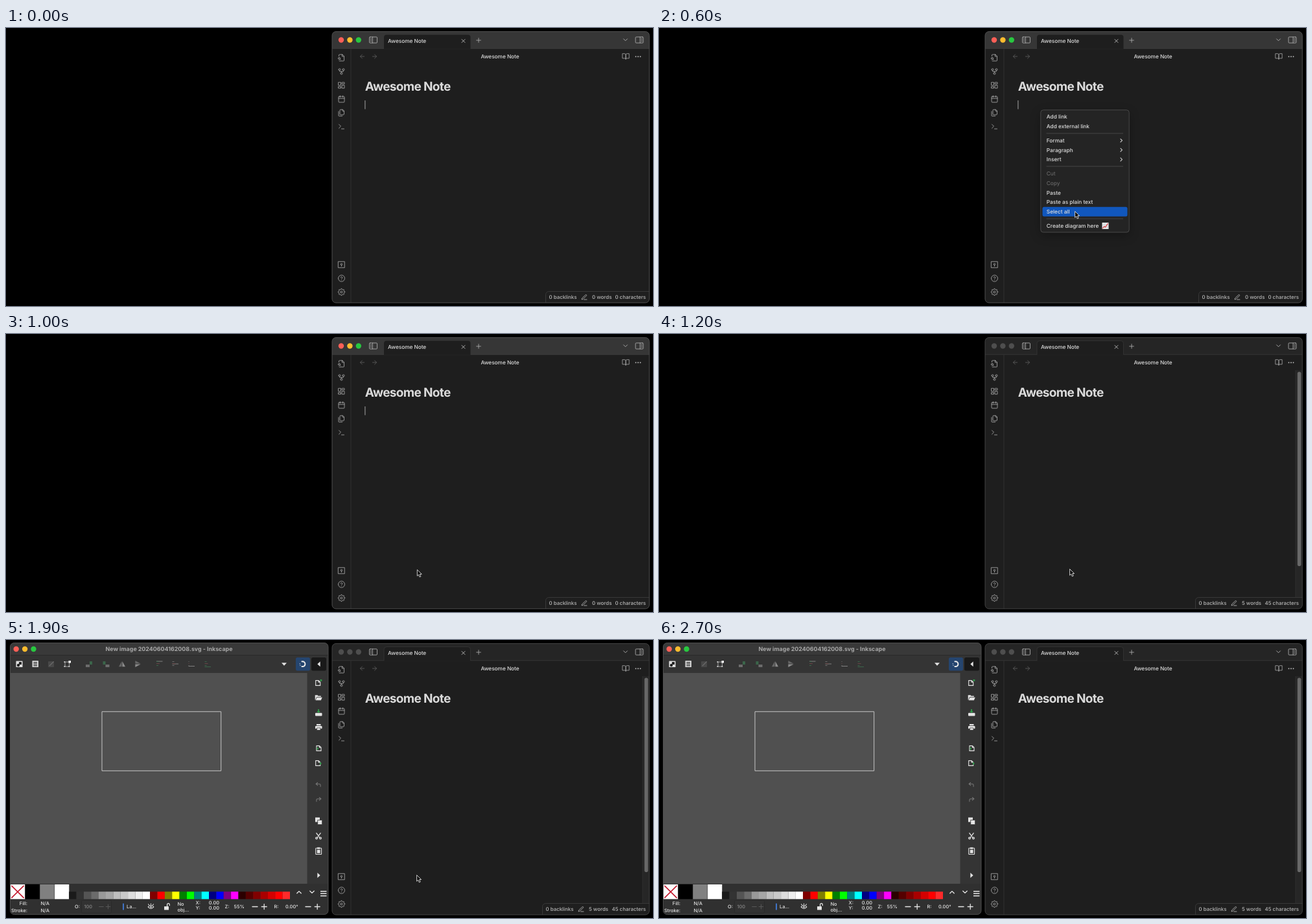
Recreate the animation shown at these times as an HTML page with a canvas. Size 998 px wide and 430 px high, loop 2800 ms.

```html
<!DOCTYPE html>
<html lang="en">
<head>
<meta charset="utf-8">
<title>Create a diagram from a note</title>
<style>
html, body { margin: 0; width: 100%; height: 100%; overflow: hidden; background: #000; }
canvas { display: block; width: 998px; height: 430px; }
</style>
</head>
<body>
<canvas id="stage" width="998" height="430"></canvas>
<script>
const c = document.getElementById('stage').getContext('2d');
const LOOP = 2800, STEP = 100;
const FONT = 'Inter, "Liberation Sans", sans-serif';

// ---------- helpers ----------
function box(x, y, w, h, fill, r = 0, stroke, lw = 1) {
  c.beginPath();
  c.roundRect(x, y, w, h, r);
  if (fill) { c.fillStyle = fill; c.fill(); }
  if (stroke) { c.strokeStyle = stroke; c.lineWidth = lw; c.stroke(); }
}
function dot(x, y, r, fill) {
  c.beginPath();
  c.arc(x, y, r, 0, Math.PI * 2);
  c.fillStyle = fill;
  c.fill();
}
function text(s, x, y, size, color, weight = 500, align = 'left', spacing = 0) {
  c.font = `${weight} ${size}px ${FONT}`;
  c.letterSpacing = spacing + 'px';
  c.textAlign = align;
  c.textBaseline = 'alphabetic';
  c.fillStyle = color;
  c.fillText(s, x, y + size * 0.36);
}
// Path in a 24-unit square centred on x, y.
function icon(d, x, y, size = 12, color = '#a4a4a4', lw = 1.75, fill = false) {
  c.save();
  c.translate(x - size / 2, y - size / 2);
  c.scale(size / 24, size / 24);
  c.lineWidth = lw;
  c.lineCap = c.lineJoin = 'round';
  c.strokeStyle = c.fillStyle = color;
  const p = new Path2D(d);
  if (fill) c.fill(p); else c.stroke(p);
  c.restore();
}
const ring = (x, y, r) => `M${x - r} ${y}a${r} ${r} 0 1 0 ${2 * r} 0a${r} ${r} 0 1 0 ${-2 * r} 0`;
const rect = (x, y, w, h) => `M${x} ${y}h${w}v${h}h${-w}z`;

function gear() {
  let d = '';
  for (let i = 0; i < 32; i++) {
    const a = (i - 0.5) * Math.PI / 16, r = i % 4 < 2 ? 10.5 : 8;
    d += `${i ? 'L' : 'M'}${12 + r * Math.cos(a)} ${12 + r * Math.sin(a)}`;
  }
  return d + 'z' + ring(12, 12, 3);
}

const ICON = {
  search: 'M14 2v6h6M4.3 21a2 2 0 0 0 1.7 1H18a2 2 0 0 0 2-2V7l-5-5H6a2 2 0 0 0-2 2v3M9 18l-1.5-1.5' + ring(5, 14, 3),
  fork: ring(12, 18, 3) + ring(6, 6, 3) + ring(18, 6, 3) + 'M18 9v2q0 1-1 1H7q-1 0-1-1V9M12 12v3',
  board: rect(3, 3, 7, 9) + rect(14, 3, 7, 5) + rect(14, 12, 7, 9) + rect(3, 16, 7, 5),
  calendar: 'M8 2v4M16 2v4M3 10h18M5 4h14a2 2 0 0 1 2 2v14a2 2 0 0 1-2 2H5a2 2 0 0 1-2-2V6a2 2 0 0 1 2-2z',
  files: 'M20 7h-3a2 2 0 0 1-2-2V2M9 18a2 2 0 0 1-2-2V4a2 2 0 0 1 2-2h7l4 4v10a2 2 0 0 1-2 2zM3 7.6v12.8A1.6 1.6 0 0 0 4.6 22h9.8',
  prompt: 'M4 17l6-6-6-6M12 19h8',
  vault: rect(2.5, 2.5, 19, 19) + ring(12, 11, 2.5) + 'M12 14v3',
  help: ring(12, 12, 10) + 'M9.1 9a3 3 0 0 1 5.8 1c0 2-3 3-3 3M12 17h.01',
  gear: gear(),
  panel: 'M3 3.5h18a2 2 0 0 1 2 2v13a2 2 0 0 1-2 2H3a2 2 0 0 1-2-2v-13a2 2 0 0 1 2-2zM10 3.5v17M4.5 8h2M4.5 12h2M4.5 16h2',
  book: 'M2 3h6a4 4 0 0 1 4 4v14a3 3 0 0 0-3-3H2zM22 3h-6a4 4 0 0 0-4 4v14a3 3 0 0 1 3-3h7z',
  back: 'M12 19l-7-7 7-7M19 12H5',
  next: 'M12 5l7 7-7 7M5 12h14',
  pen: 'M11 20h10M16.5 3.5a2.1 2.1 0 0 1 3 3L7 19l-4 1 1-4z',
  cross: 'M5 5l14 14M19 5L5 19',
  plus: 'M12 4v16M4 12h16',
  minus: 'M4 12h16',
  down: 'M5 8l7 7 7-7',
  up: 'M5 16l7-7 7 7',
  right: 'M9 5l7 7-7 7'
};

function lights(x, y, on) {
  ['#ff5f57', '#febc2e', '#28c840'].forEach((k, i) =>
    dot(x + i * 13.4, y, 4.2, on ? k : '#4e4e4e'));
}

// ---------- note window ----------
function noteWindow(on) {
  c.save();
  box(503, 5.5, 489.3, 419.5, '#1e1e1e', 6);
  c.clip();
  box(503, 5, 490, 27, on ? '#363636' : '#252525');
  box(503, 31.3, 490, 1, on ? '#3c3c3c' : '#343434');
  box(531.5, 32, 1, 393, '#313131');
  box(583, 10.5, 133.5, 22, '#1e1e1e', [4, 4, 0, 0]);
  if (!on) {
    c.beginPath();
    c.moveTo(583, 32);
    c.arcTo(583, 10.5, 600, 10.5, 4);
    c.arcTo(716.5, 10.5, 716.5, 32, 4);
    c.lineTo(716.5, 32);
    c.strokeStyle = '#343434';
    c.lineWidth = 0.9;
    c.stroke();
  }
  lights(517, 18.5, on);

  icon(ICON.panel, 566.5, 18.5, 13);
  c.save();
  c.translate(977, 18.5);
  c.scale(-1, 1);
  icon(ICON.panel, 0, 0, 13);
  c.restore();
  text('Awesome Note', 589, 20, 8.3, '#dadada', 500, 'left', -0.05);
  icon(ICON.cross, 705.5, 20, 8.5, '#c4c4c4', 2.4);
  icon(ICON.plus, 729, 19, 10, '#b0b0b0', 2);
  icon(ICON.down, 955.5, 18.5, 10, '#b0b0b0', 2.2);

  icon(ICON.back, 549.5, 44, 10.5, '#5c5c5c', 2);
  icon(ICON.next, 568.5, 44, 10.5, '#5c5c5c', 2);
  text('Awesome Note', 762, 44, 8.3, '#dadada', 500, 'center', -0.05);
  icon(ICON.book, 956, 44, 11.5);
  [-3.5, 0, 3.5].forEach(d => dot(975 + d, 44.2, 0.95, '#b8b8b8'));

  ['search', 'fork', 'board', 'calendar', 'files', 'prompt'].forEach((k, i) =>
    icon(ICON[k], 517.5, 46 + i * 21.3));
  ['vault', 'help', 'gear'].forEach((k, i) => icon(ICON[k], 517.5, 366 + i * 21.2));

  text('Awesome Note', 553.7, 90.2, 19, '#dadada', 700, 'left', -0.66);
  if (on) box(553.4, 112, 1, 13.5, '#a6a6a6');
  else {
    box(981.5, 56, 11, 370, '#262626');
    box(981.5, 56, 1, 370, '#2c2c2c');
    box(984.8, 58.5, 5.6, 300.5, '#686868', 2.8);
  }

  const x = on ? 832.5 : 827.5;
  box(x, 407.5, 170, 25, '#1f1f1f', [5, 0, 0, 0], '#383838');
  text('0 backlinks', x + 5, 416.5, 7.9, '#b6b6b6');
  icon(ICON.pen, x + 59.5, 416.5, 10.5, '#b6b6b6', 2);
  text(on ? '0 words' : '5 words', x + 71.5, 416.5, 7.9, '#b6b6b6');
  text(on ? '0 characters' : '45 characters', 987, 416.5, 7.9, '#b6b6b6', 500, 'right');
  c.restore();
  box(503, 5.5, 489.3, 419.5, null, 6, on ? '#4e4e4e' : '#424242');
}

// ---------- context menu ----------
const MENU = [
  ['Add link', 137.5], ['Add external link', 152.3],
  ['Format', 174, 'sub'], ['Paragraph', 188.7, 'sub'], ['Insert', 203.4, 'sub'],
  ['Cut', 225.4, 'off'], ['Copy', 240, 'off'], ['Paste', 254.8],
  ['Paste as plain text', 269.4], ['Select all', 284], ['Create diagram here', 306]
];
function menu(p) {
  c.save();
  c.shadowColor = 'rgba(0,0,0,.3)';
  c.shadowBlur = 16;
  c.shadowOffsetY = 5;
  box(588.8, 126.8, 136.4, 189.2, '#242424', 4);
  c.restore();
  box(588.8, 126.8, 136.4, 189.2, null, 4, '#484848');
  [163, 214, 295].forEach(y => box(597.5, y - 0.5, 118.5, 1, '#444'));
  for (const [label, y, kind] of MENU) {
    if (p.x > 591 && kind !== 'off' && Math.abs(p.y - y) < 7.3)
      box(591.5, y - 7.3, 131, 14.8, '#1157bd', 2.5);
    text(label, 597.8, y, 8.25, kind === 'off' ? '#676767' : '#dedede');
    if (kind === 'sub') icon(ICON.right, 713, y, 8.5, '#d0d0d0', 3);
  }
  box(683.5, 301, 10, 10, '#ececec', 0.5);
  for (let i = 1; i < 4; i++) {
    box(683.5 + i * 2.5, 301, 0.4, 10, '#bcc8cc');
    box(683.5, 301 + i * 2.5, 10, 0.4, '#bcc8cc');
  }
  icon('M2 21l6-7 4 3 9-13', 688.5, 306, 10, '#d9363c', 2.6);
}

// ---------- pointer ----------
const TRACK = [[200, 588, 126], [600, 641, 283], [700, 646, 304], [800, 646, 304],
  [1000, 633.7, 364], [1100, 633.7, 364], [1200, 633, 363]];
function pointerAt(t) {
  let a = TRACK[0];
  for (const b of TRACK) {
    if (t <= b[0]) {
      const k = b === a ? 0 : Math.max(0, (t - a[0]) / (b[0] - a[0]));
      const e = k * k * (3 - 2 * k);
      return { x: a[1] + (b[1] - a[1]) * e, y: a[2] + (b[2] - a[2]) * e };
    }
    a = b;
  }
  return { x: a[1], y: a[2] };
}
function pointer({ x, y }) {
  c.save();
  c.translate(x, y);
  const p = new Path2D('M.6.6V10.2L2.8 8.2 4.3 11.9 6.1 11.1 4.6 7.5H7.6z');
  c.fillStyle = '#080808';
  c.strokeStyle = '#d6d6d6';
  c.lineWidth = 0.95;
  c.lineJoin = 'round';
  c.fill(p);
  c.stroke(p);
  c.restore();
}

// ---------- drawing window ----------
function triangle(x, y, r, turn, color) {
  c.save();
  c.translate(x, y);
  c.rotate(turn * Math.PI / 2);
  c.beginPath();
  c.moveTo(r * 0.55, 0);
  c.lineTo(-r * 0.55, -r);
  c.lineTo(-r * 0.55, r);
  c.fillStyle = color;
  c.fill();
  c.restore();
}

function topTools() {
  const w = '#dedede', dim = '#6c6c6c', gray = '#808080', green = '#3b654a';
  box(15.5, 32.5, 10, 9.5, w, 0.5);
  dot(19, 39, 2.2, '#222');
  box(20, 34, 4, 4, '#222');
  box(40.5, 32, 9.5, 10, '#d0d0d0', 0.5);
  [34, 36.5, 39].forEach(y => box(42.5, y, 5.5, 1.3, '#333'));
  box(65, 33, 9, 9, '#484848', 1);
  icon('M5 19L20 4', 70, 37, 10, '#707070', 2.5);
  box(91, 34, 6.5, 7, null, 0, '#bbb', 0.8);
  [[90, 33], [90, 40], [97, 40]].forEach(([x, y]) => box(x - 0.5, y, 1.8, 1.8, w));
  box(96.5, 32, 3.5, 3.5, '#fff');

  [128.5, 154].forEach((x, i) => {
    const s = i ? -1 : 1;
    box(x - s * 2.5 - 3, 38, 6, 4, dim);
    box(x + s * 2.5 - 2, 33, 4, 5, green);
  });
  icon('M11 3v18H1z', 179, 37, 11, '#666', 1, true);
  icon('M13 3v18h10z', 179, 37, 11, '#8c8c8c', 1, true);
  icon('M3 1v10h18z', 203.5, 37, 11, '#666', 1, true);
  icon('M3 13v10l18-10z', 203.5, 37, 11, '#8c8c8c', 1, true);
  [236.5, 261, 286, 311].forEach((x, i) => {
    const y = [32.5, 36.5, 40, 41][i];
    box(x - 4.5, y, 9.5, 1, i === 3 ? green : gray);
    for (let k = 0; k < 3; k++)
      box(x - 4.5, 33 + k * 3, i === 2 ? 1 : 3 + (k % 2) * 2, 1, k === 1 ? '#684646' : i % 3 ? dim : green);
  });
}

function entry(label, x, w) {
  text(label, x - 2.5, 37, 7.8, '#a0a0a0', 500, 'right');
  box(x + 0.5, 26.5, w, 21.5, '#323232', 2, '#252525');
  text('0.000', x + 4, 37, 7.6, '#a0a0a0');
}

function page(x, y) {
  icon('M4 3h10l6 6v12H4zM14 3v6h6', x, y, 10.5, '#e0e0e0', 2.6);
}
function sideTools() {
  const w = '#e4e4e4', g = '#2f9a48', x = 482;
  page(x - 0.8, 66.5);
  box(x + 2.5, 61, 2.8, 2.8, g);
  icon('M1 20V4h8l2 3h9v3H6L2 20zM7 11.5h17L20 21H3z', x, 89, 11.5, w, 1, true);
  box(x - 5, 112.8, 10.5, 4.7, w, 1);
  box(x - 0.8, 107, 1.8, 3.5, g);
  triangle(x + 0.1, 111.5, 2.8, 1, g);
  box(x - 3, 130, 6.5, 2.3, w);
  box(x - 5, 133, 10.5, 4.3, w, 1);
  box(x - 2.5, 136, 5.5, 3.5, w, 0, '#333', 0.7);
  page(x + 0.5, 167.5);
  triangle(x - 1, 168, 2.6, 0, g);
  page(x - 0.8, 190.5);
  triangle(x + 3.5, 191, 2.6, 0, g);
  icon('M9 4L3 9l6 5M3 9h12a4 4 0 0 1 4 4v5', x, 224, 10.5, '#777', 2.4);
  icon('M15 4l6 5-6 5M21 9H9a4 4 0 0 0-4 4v5', x, 247, 10.5, '#777', 2.4);
  box(x - 5, 274.5, 7, 7, w);
  box(x - 1.3, 278.5, 7, 7, w, 0, '#333', 0.8);
  icon('M5 2l11 15M19 2L8 17' + ring(5.5, 19, 3) + ring(18.5, 19, 3), x, 303.3, 11, w, 2.8);
  box(x - 4.2, 322, 8.8, 9.5, null, 0.5, w, 1.1);
  box(x - 2, 320.8, 4.4, 2.4, w);
  box(x - 2.2, 324.5, 4.8, 5.3, w);
  triangle(x + 0.5, 364, 4, 0, w);
}

const GRAYS = [26, 51, 84, 107, 153, 166, 191, 200, 221, 238, 255];
const HUES = ['800000', 'f00', '808000', 'ff0', '008000', '0f0', '008080', '0ff', '000080', '00f', '800080', 'f0f',
  '2b0000', '500', '800000', 'a00', 'd40000', 'f00', 'ff2a2a'];
function palette() {
  ['#fff', '#000', '#808080', '#fff'].forEach((k, i) => box(7 + i * 22.7, 378, 22.2, 22.8, k));
  icon('M1 1l22 22M23 1L1 23', 18, 389.5, 20, '#c42034', 2);
  GRAYS.map(v => `rgb(${v},${v},${v})`).concat(HUES.map(h => '#' + h)).forEach((k, i) =>
    box(97.2 + i * 11.36, 389.3, 11.36, 11.4, k));
  icon(ICON.up, 452, 390, 11, '#e6e6e6', 3);
  icon(ICON.down, 472, 390, 11, '#e6e6e6', 3);
  [388, 391.5, 395].forEach(y => box(485, y, 9.5, 1.4, '#e6e6e6'));
}

function statusBar() {
  const w = '#e4e4e4', t = (s, x, y, align, color = w) => text(s, x, y, 7.4, color, 500, align);
  t('Fill:', 33, 407, 'right');
  t('Stroke:', 33, 418.3, 'right');
  t('N/A', 53.5, 407);
  t('N/A', 53.5, 418.3);
  t('O:', 106, 412.5);
  box(116.5, 402.5, 46, 20, '#323232', 2, '#2a2a2a');
  t('100', 120.5, 412.5, 'left', '#858585');
  icon(ICON.minus, 147, 412.5, 10, '#585858', 2.4);
  icon(ICON.plus, 157.5, 412.5, 10, '#585858', 2.4);
  box(180, 407.5, 2, 10, '#3f74c8');
  t('La...', 186, 412.5);
  icon('M2 13q10-12 20 0q-10 12-20 0M5 6L3 3M12 4V1M19 6l2-3' + ring(12, 13, 2), 223.5, 412.5, 10.5, w, 2.3);
  box(244, 412, 7, 5.5, w, 0.5);
  icon('M10 15V7a4 4 0 0 1 8 0v3', 249.5, 411.5, 11, w, 2.8);
  t('No', 264.5, 408.5);
  t('obj...', 264.5, 417.5);
  t('X:', 292.5, 406.3);
  t('Y:', 292.5, 414.7);
  t('0.00', 329, 406.3, 'right');
  t('0.00', 329, 414.7, 'right');
  t('Z:', 337.5, 412.5);
  t('55%', 351.5, 412.5);
  t('R:', 413.5, 412.5);
  t('0.00°', 431, 412.5);
  [384, 466].forEach(x => {
    icon(ICON.minus, x, 412.5, 12, w, 2.6);
    icon(ICON.plus, x + 14.2, 412.5, 12, w, 2.6);
  });
}

function drawWindow(ready) {
  c.save();
  box(6.5, 4.5, 490.5, 420, '#343434', 6);
  c.clip();
  box(6, 4, 492, 19, '#393939');
  box(6, 23, 492, 1, '#292929');
  lights(15.7, 14, true);
  text('New image 20240604162008.svg - Inkscape', 251.5, 13.8, 8.88, '#a9a9a9', 700, 'center');
  topTools();
  if (!ready) {
    entry('X:', 344.5, 79);
    icon(ICON.minus, 406, 37, 10, '#585858', 2.2);
    icon(ICON.plus, 417.5, 37, 10, '#585858', 2.2);
    entry('Y:', 438, 70);
  } else {
    triangle(429, 37.5, 4, 1, '#e4e4e4');
    box(447, 27, 22, 20.5, '#25456f', 2.5);
    icon('M10 4.5h2a7.5 7.5 0 0 1 0 15h-2', 457.5, 37.2, 12.5, '#e8e8e8', 3.8);
    icon('M4 11v.1M5 16v.1', 457.5, 37.2, 12.5, '#c4ccd6', 2.6);
    box(471, 27, 23, 20.5, '#191919', 2.5);
    triangle(482.5, 37.3, 4, 2, '#e4e4e4');
    box(6, 51, 458.5, 326, '#505050');
    box(148, 110.8, 183.7, 91.5, null, 0, '#c6c6c6');
    sideTools();
    box(6, 377, 492, 49, '#303030');
    palette();
    statusBar();
  }
  c.restore();
  box(6.5, 4.5, 490.5, 420, null, 6, '#4c4c4c');
}

// ---------- timeline ----------
function draw(t) {
  c.fillStyle = '#000';
  c.fillRect(0, 0, 998, 430);
  const p = pointerAt(t);
  noteWindow(t < 1200);
  if (t >= 200 && t < 900) menu(p);
  if (t >= 1800) drawWindow(t >= 1900);
  if (t >= 100 && t < 2400) pointer(p);
}

c.textRendering = 'geometricPrecision';
const start = performance.now();
function tick() {
  const t = (performance.now() - start) % LOOP;
  draw(Math.floor(t / STEP) * STEP);
  requestAnimationFrame(tick);
}
tick();
</script>
</body>
</html>
```
